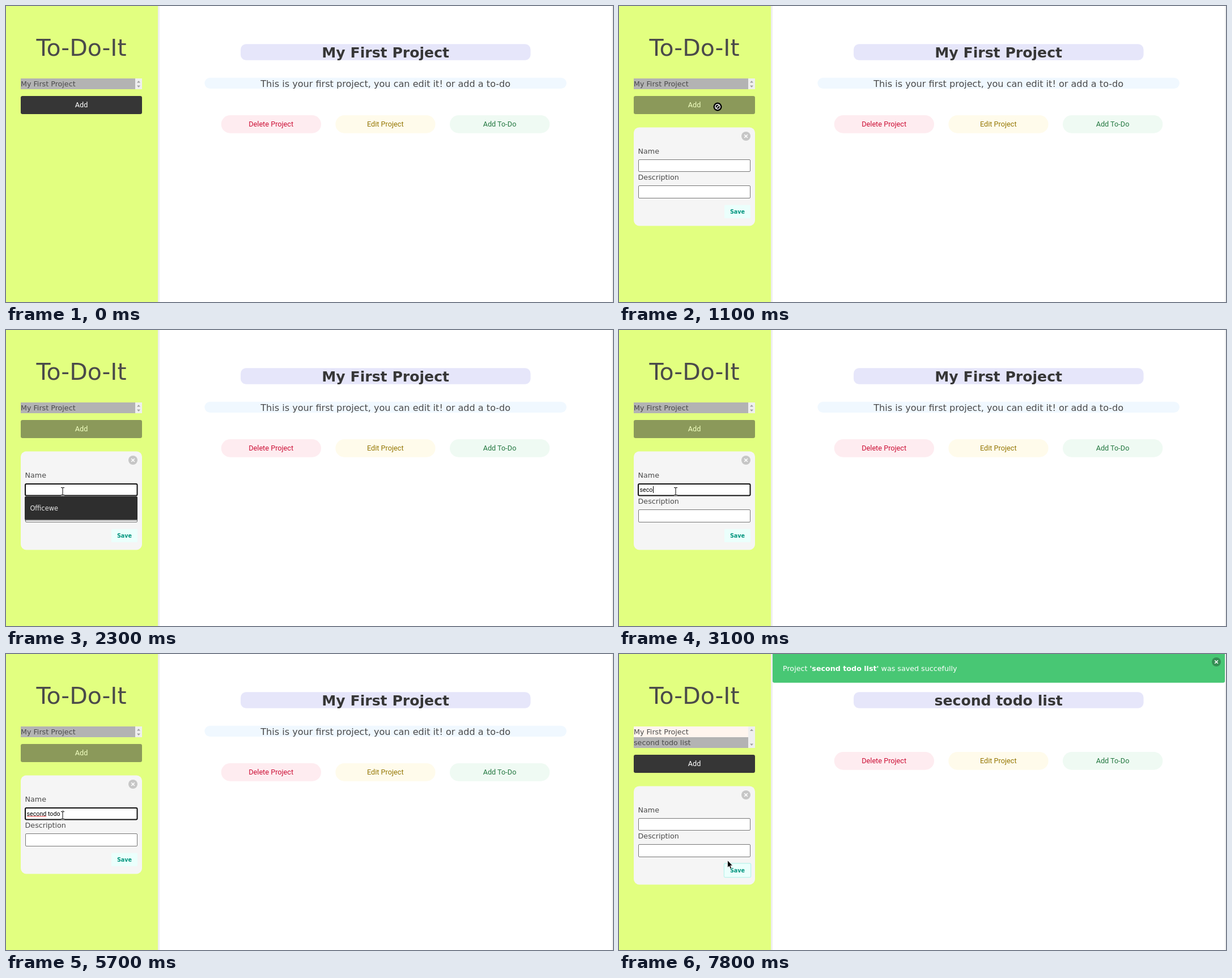
Recreate the animation shown at these times as an HTML page. Size 1071 px wide and 523 px high, loop 8 s.

```html
<!DOCTYPE html>
<html lang="en">
<head>
<meta charset="utf-8">
<title>To-do list</title>
<style>
html, body { margin: 0; width: 100%; height: 100%; overflow: hidden; background: #fff; }
svg { display: block; width: 1071px; height: 523px; }
text { font: 12.7px "DejaVu Sans", Verdana, sans-serif; fill: #4a4a4a; white-space: pre; }
.mid { text-anchor: middle; }
.ui { font-family: Roboto, sans-serif; }
.typed { font: 10.667px Roboto, sans-serif; fill: #000; }
.box { fill: #fff; stroke: #767676; }
.cross { stroke: #fff; stroke-width: 1.6; }
</style>
</head>
<body>
<svg viewBox="0 0 1071 523">
  <defs>
    <circle id="close" r="8" fill="#0a0a0a"/>
    <path id="cross" class="cross" d="M-2.8-2.8 2.8 2.8M-2.8 2.8 2.8-2.8"/>
  </defs>

  <rect width="268" height="523" fill="#e2ff80"/>
  <rect x="268" width="3" height="523" fill="#eee"/>
  <rect x="1069" width="2" height="523" fill="#eee"/>
  <text class="mid" x="133" y="88" style="font-size:41px">To-Do-It</text>

  <g id="oneRow">
    <rect x="26" y="128" width="202" height="19" fill="#b3b3b3"/>
    <rect x="228" y="128" width="12" height="19" fill="#efefef"/>
    <path d="M231 135.5h6l-3-3.5zM231 140.5h6l-3 3.5z" fill="#a0a0a0"/>
  </g>
  <g id="twoRows">
    <rect x="26" y="128" width="202" height="19" fill="#fff5ee"/>
    <rect x="26" y="147" width="202" height="19" fill="#b3b3b3"/>
    <rect x="228" y="128" width="12" height="38" fill="#efefef"/>
    <path d="M231 136h6l-3-3.5zM231 158.5h6l-3 3.5z" fill="#a0a0a0"/>
    <text x="26" y="161">second todo list</text>
  </g>
  <text x="26" y="142">My First Project</text>

  <g id="side">
    <g id="add">
      <rect id="addBox" x="26" y="159" width="214" height="32" rx="3.2"/>
      <text class="mid ui" x="133" y="179" style="fill:#fff">Add</text>
    </g>
    <g id="form">
      <rect x="26" y="214.4" width="214" height="174" rx="9.6" fill="#f5f5f5"/>
      <g transform="translate(224 230)"><use href="#close" opacity=".2"/><use href="#cross"/></g>
      <text x="33.6" y="261">Name</text>
      <text x="33.6" y="307">Description</text>
      <rect class="box" x="34.5" y="271.5" width="197" height="21" rx="1.5"/>
      <rect id="descBox" class="box" x="34.5" y="317.5" width="197" height="22" rx="1.5"/>
      <rect id="ring" x="34" y="272" width="197.5" height="20.5" rx="2" fill="#fff" stroke="#101010" stroke-width="2"/>
      <text id="typed" class="typed" x="36.6" y="286"></text>
      <path id="squiggle" fill="none" stroke="#e33" stroke-width=".9"/>
      <rect id="caret" y="276" width="1" height="12"/>
      <rect id="saveRing" x="184.8" y="350.3" width="48.4" height="26" rx="3" fill="#baf3eb"/>
      <rect id="saveBox" x="186" y="351.5" width="46" height="23.6" rx="1.6"/>
      <text class="mid" x="209" y="366.5" style="font-size:9.6px;font-weight:bold;fill:#00947e">Save</text>
    </g>
  </g>

  <g id="hint">
    <rect x="33" y="295" width="199" height="42.5" rx="2" fill="#000" opacity=".25"/>
    <rect x="33" y="294" width="199" height="41.5" rx="2" fill="#2e2e2e"/>
    <text x="42.4" y="319" style="font-size:11.4px;fill:#e6e6e6">Officewe</text>
  </g>

  <rect x="414" y="67.3" width="511.5" height="28.5" rx="9.6" fill="#e6e6fa"/>
  <text id="title" class="mid" x="669.7" y="91" style="font-size:25.15px;font-weight:bold;fill:#363636"></text>
  <g id="about">
    <rect x="350.4" y="126.7" width="638.5" height="19.3" rx="9.6" fill="#f0f8ff"/>
    <text class="mid" x="669.7" y="143" style="font-size:16.08px">This is your first project, you can edit it! or add a to-do</text>
  </g>
  <g id="actions"></g>

  <g id="toast">
    <path d="M271 0H1069V47.5a3.2 3.2 0 0 1-3.2 3.2H274.2a3.2 3.2 0 0 1-3.2-3.2z" fill="#48c774"/>
    <text x="289" y="30" style="fill:#fff">Project <tspan font-weight="bold">'second todo list'</tspan> was saved succefully</text>
    <g transform="translate(1054 14)"><use href="#close" opacity=".3"/><use href="#cross"/></g>
  </g>

  <g id="pointer">
    <path id="arrow" d="M0 0V13L3 10.3 5 15.3 7.2 14.4 5.2 9.4H9z" fill="#000" stroke="#fff" stroke-width=".8"/>
    <path id="hand" d="M-1.5 0a1.4 1.4 0 0 1 2.8 0V5.5L6.5 7Q8 7.5 7.6 10L6.5 15H-1.5L-5.5 9Q-5 7-1.5 10z" fill="#000" stroke="#fff" stroke-width=".9"/>
    <g id="beam" fill="none">
      <path d="M-3-6.5H-1L0-6 1-6.5H3M0-6V6M-3 6.5H-1L0 6 1 6.5H3" stroke="#fff" stroke-width="2.6"/>
      <path d="M-3-6.5H-1L0-6 1-6.5H3M0-6V6M-3 6.5H-1L0 6 1 6.5H3" stroke="#000"/>
    </g>
    <g id="deny" fill="none">
      <circle r="7.5" fill="#000"/>
      <circle r="4.3" stroke="#fff" stroke-width="1.5"/>
      <path d="M-3 3 3-3" stroke="#fff" stroke-width="1.5"/>
    </g>
  </g>
</svg>
<script>
const LOOP = 8000;
const $ = id => document.getElementById(id);
const show = (id, on) => $(id).setAttribute("display", on ? "inline" : "none");
const move = (id, x, y) => $(id).setAttribute("transform", `translate(${x} ${y})`);

// label, centre x, fill, text colour
$("actions").innerHTML = [
  ["Delete Project", 467.7, "#feecf0", "#cc0f35"],
  ["Edit Project", 669.3, "#fffbeb", "#947600"],
  ["Add To-Do", 871, "#effaf3", "#257942"]
].map(([label, x, fill, ink]) =>
  `<rect x="${x - 88}" y="193" width="176.3" height="31.7" rx="15.8" fill="${fill}"/>
   <text class="mid ui" x="${x}" y="213" style="fill:${ink}">${label}</text>`).join("");

let wave = "M37 287.5";
for (let x = 37; x < 71; x += 2) wave += "l1-1.2 1 1.2";
$("squiggle").setAttribute("d", wave);

// start time, shape, x, y
const pointerSteps = [
  [0, ""],
  [300, "arrow", 207, 81], [400, "arrow", 201, 103], [500, "arrow", 193, 128],
  [600, "hand", 184, 163], [700, "hand", 177, 171], [800, "hand", 174, 174],
  [1100, "deny", 174, 178], [1200, "deny", 168, 182], [1300, "arrow", 152, 205],
  [1400, "arrow", 132, 238], [1500, "arrow", 113, 262], [1600, "beam", 103, 280],
  [1700, "beam", 100, 285],
  [6800, "beam", 152, 326], [7100, "arrow", 195, 361], [7500, "arrow", 191.5, 364.5]
];

// start time, typed text, caret x (0 = hidden)
const typeSteps = [
  [0, "", 0], [1700, "", 37], [2300, "", 0],
  [3100, "seco", 60], [3400, "secon", 66], [3600, "second", 71], [4300, "second", 0],
  [4500, "second ", 74], [4800, "second to", 84], [5000, "second tod", 89],
  [5300, "second todo", 96], [5700, "second todo l", 100], [6000, "second todo lis", 108],
  [6300, "second todo list", 112], [6800, "second todo list", 0], [7800, "", 0]
];

const at = (steps, t) => steps.findLast(s => s[0] <= t);

function draw(t) {
  const within = (a, b) => t >= a && t < b;
  const open = t >= 1100, saved = t >= 7800;

  const [, shape, px, py] = at(pointerSteps, t);
  for (const id of ["arrow", "hand", "beam", "deny"]) show(id, id === shape);
  if (shape) move("pointer", px, py);

  const [, text, caretX] = at(typeSteps, t);
  $("typed").textContent = text;
  show("caret", caretX);
  $("caret").setAttribute("x", caretX);

  show("form", open);
  show("ring", within(1700, 7500));
  show("hint", within(1700, 3100));
  show("squiggle", within(4500, 7100));
  $("descBox").style.stroke = within(6800, 7100) ? "#4f4f4f" : "#767676";
  $("saveBox").setAttribute("fill", within(7100, 7800) ? "#d1fff8" : "#ebfffc");
  show("saveRing", saved);

  $("add").setAttribute("opacity", open && !saved ? .5 : 1);
  $("addBox").setAttribute("fill", within(600, 1100) ? "#2f2f2f" : "#363636");

  show("oneRow", !saved);
  show("twoRows", saved);
  show("about", !saved);
  show("toast", saved);
  move("side", 0, saved ? 19 : 0);
  move("actions", 0, saved ? -20 : 0);
  $("title").textContent = saved ? "second todo list" : "My First Project";
}

function tick() {
  draw(performance.now() % LOOP);
  requestAnimationFrame(tick);
}
tick();
</script>
</body>
</html>
```
